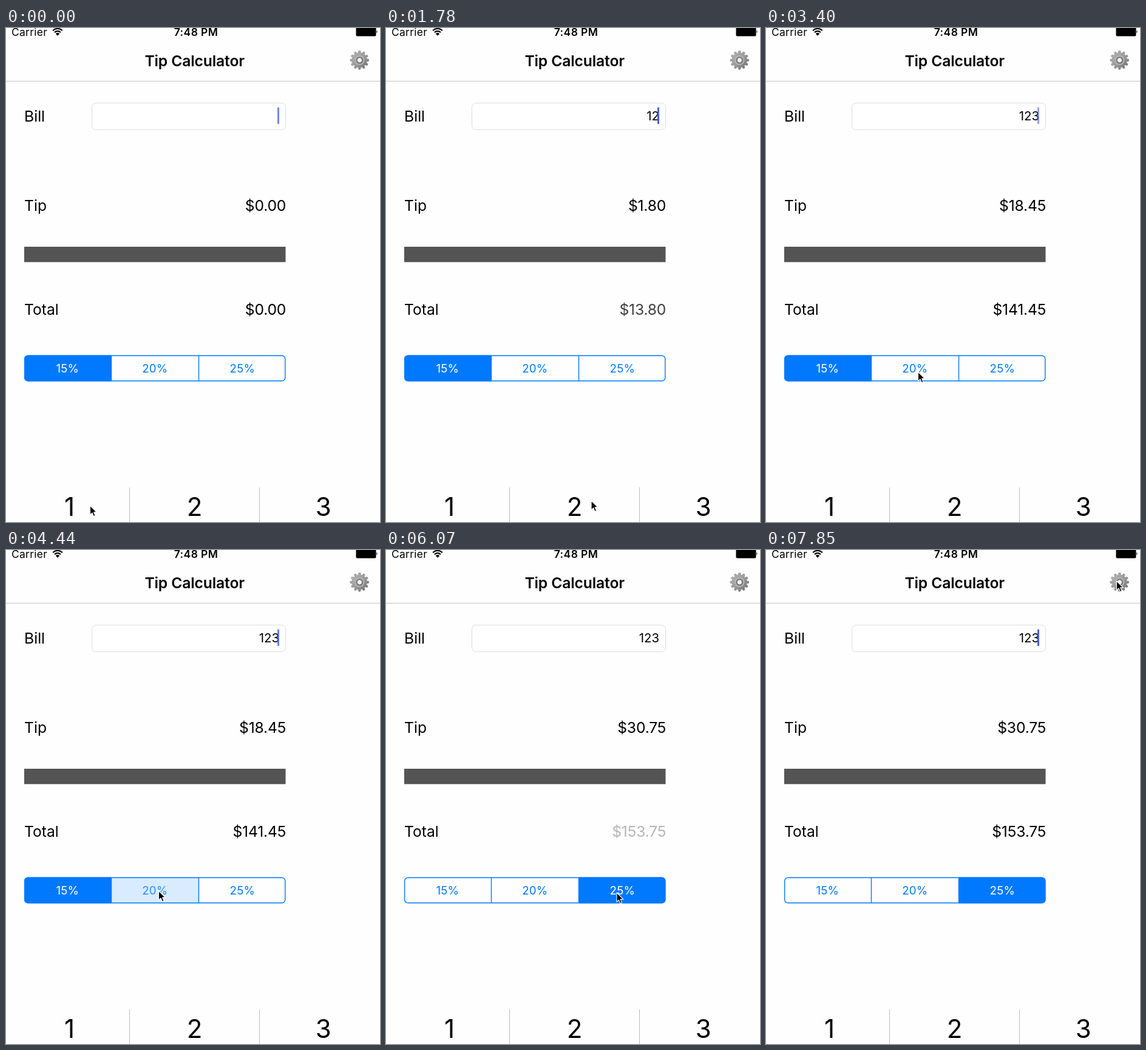
Animation of 616x813 px, one loop 8000 ms. Source, as an HTML page:

```html
<!DOCTYPE html>
<html lang="en">
<head>
<meta charset="utf-8">
<title>Tip Calculator</title>
<style>
  html, body { margin: 0; width: 100%; height: 100%; overflow: hidden; background: #fefefe; }
  svg { display: block; width: 616px; height: 813px; font-family: Inter, Roboto, sans-serif; }
  .label { font-size: 24.7px; }
  .amount { font-size: 24.7px; letter-spacing: -.2px; text-anchor: end; }
  .title { font-size: 24.7px; font-weight: 600; letter-spacing: -.15px; text-anchor: middle; }
  .status { font-size: 17.5px; letter-spacing: .25px; }
  .clock { font-weight: 600; letter-spacing: .4px; text-anchor: middle; }
  .field { font-size: 20.4px; text-anchor: end; }
  .seg text { font-size: 18.8px; letter-spacing: .15px; text-anchor: middle; fill: #0079ff; }
  .seg rect { fill: none; }
  .seg .pressed rect { fill: #d8ebff; }
  .seg .pressed text { fill: #2b8fff; }
  .seg .chosen rect { fill: #0079ff; }
  .seg .chosen text { fill: #fff; }
  .key text { font-size: 42px; text-anchor: middle; }
  .key rect { fill: none; }
  .key.pressed rect { fill: #d1d5db; }
</style>
</head>
<body>
<svg viewBox="0 0 616 813">
  <defs>
    <linearGradient id="metal" x1="0" y1="0" x2="1" y2="1">
      <stop offset="0" stop-color="#b9b9b9"/>
      <stop offset=".55" stop-color="#989898"/>
      <stop offset="1" stop-color="#686868"/>
    </linearGradient>
    <clipPath id="pill"><rect x="30" y="538.5" width="430.5" height="43" rx="6"/></clipPath>
  </defs>
  <rect width="616" height="813" fill="#fefefe"/>

  <text class="status" x="9" y="13">Carrier</text>
  <g fill="none" stroke="#000" stroke-width="2.3">
    <path d="M77.2 4.2A11 11 0 0 1 92.8 4.2"/>
    <path d="M80 7.2A7 7 0 0 1 90 7.2"/>
  </g>
  <path d="M85 12.8L81.8 9.4A4.6 4.6 0 0 1 88.2 9.4Z"/>
  <text class="status clock" x="313" y="13">7:48 PM</text>
  <rect x="576.5" y="-2" width="33" height="15.5" rx="2"/>
  <path d="M610.5 3.5q2.2 2.5 0 5z"/>

  <text class="title" x="310.7" y="63">Tip Calculator</text>
  <path d="M0 87.5H616" stroke="#c4c4c4"/>
  <g transform="translate(582.3 53)">
    <path id="gear" fill="url(#metal)" stroke="#7d7d7d" stroke-width=".6"/>
    <circle r="7.2" fill="none" stroke="#b8b8b8" stroke-width="1.6"/>
    <circle r="4.6" fill="#f4f4f4" stroke="#747474" stroke-width="1.8"/>
  </g>

  <text class="label" x="30" y="154">Bill</text>
  <rect x="141.5" y="123.5" width="319" height="44" rx="7" fill="#fff" stroke="#dedede"/>
  <text class="field" id="bill" x="450" y="152.3"></text>
  <rect id="caret" x="447" y="130.5" width="3" height="27.5" rx="1" fill="#4263de"/>

  <text class="label" x="30" y="301.3">Tip</text>
  <text class="amount" id="tip" x="461.2" y="301.3"></text>
  <rect x="30" y="360" width="430.5" height="25.3" fill="#545454"/>
  <text class="label" x="30" y="472.3">Total</text>
  <text class="amount" id="total" x="461.2" y="472.3"></text>

  <g class="seg">
    <g id="cells" clip-path="url(#pill)"></g>
    <path d="M173.5 539V581M317.5 539V581" stroke="#0079ff" stroke-width="1.4"/>
    <rect x="30.7" y="539.2" width="429.1" height="41.6" rx="5.4" stroke="#0079ff" stroke-width="1.4"/>
  </g>

  <g id="keys"></g>
  <path d="M203.5 756V813M417.5 756V813" stroke="#bcbcbc"/>

  <path id="arrow" d="M0 0V15.2L3.5 11.9L6 17.7L8.6 16.6L6.1 10.9H10.9Z"
        stroke="#fff" stroke-width="1.1" stroke-linejoin="round"/>
</svg>
<script>
const LOOP = 8000, STEPS = 54;
const $ = id => document.getElementById(id);

function add(parent, tag, attrs, text) {
  const el = document.createElementNS('http://www.w3.org/2000/svg', tag);
  for (const name in attrs) el.setAttribute(name, attrs[name]);
  if (text) el.textContent = text;
  return parent.appendChild(el);
}

function gearPath(teeth) {
  const radii = [12, 15.3, 15.3, 12], offsets = [-.34, -.18, .18, .34];
  let d = '';
  for (let i = 0; i < teeth; i++) {
    offsets.forEach((o, j) => {
      const a = (i + o) / teeth * 2 * Math.PI;
      d += (d ? 'L' : 'M') + (radii[j] * Math.cos(a)).toFixed(2) + ' ' + (radii[j] * Math.sin(a)).toFixed(2);
    });
  }
  return d + 'Z';
}
$('gear').setAttribute('d', gearPath(12));

const rates = [15, 20, 25];
const cells = rates.map((rate, i) => {
  const g = add($('cells'), 'g', {});
  add(g, 'rect', { x: 29.5 + 144 * i, y: 538, width: 144, height: 44 });
  add(g, 'text', { x: 101.3 + 144 * i, y: 567.3 }, rate + '%');
  return g;
});

const keys = [[0, 203, 104.5], [204, 213, 310.5], [418, 198, 522.7]].map(([x, width, mid], i) => {
  const g = add($('keys'), 'g', { class: 'key' });
  add(g, 'rect', { x, y: 756, width, height: 57 });
  add(g, 'text', { x: mid, y: 802.5 }, String(i + 1));
  return g;
});

// step, bill text, chosen segment
const edits = [[-9, '', 0], [3, '1', 0], [11, '12', 0], [17, '123', 0], [32, '123', 1], [41, '123', 2]];
// first step, end step, index
const keyTaps = [[1, 3, 0], [9, 11, 1], [15, 17, 2]];
const segTaps = [[30, 32, 1], [39, 41, 2]];

const smooth = u => u * u * (3 - 2 * u);
const speedUp = u => u ** 1.5;
const slowDown = u => 1 - (1 - u) ** 2.2;
// first step, last step, x, y, easing
const moves = [
  [3, 7, 306.5, 777, smooth],
  [11, 15, 508.5, 783, smooth],
  [18, 23, 250.5, 566, smooth],
  [23, 25, 251.5, 561, smooth],
  [32, 36, 380, 564, smooth],
  [45, 47, 459.5, 272.5, speedUp],
  [47, 53, 577.5, 51, slowDown]
];

function pointer(k) {
  let x = 138.5, y = 786;
  for (const [from, to, tx, ty, ease] of moves) {
    if (k <= from) break;
    const u = ease(Math.min(1, (k - from) / (to - from)));
    x += (tx - x) * u;
    y += (ty - y) * u;
  }
  return [x, y];
}

// The caret blinks once a second, 6.75 steps; the first key press restarts it.
function caretAlpha(k) {
  const p = (k + (k < 3 ? 4.93 : 2)) % 6.75;
  if (p <= 1) return 1;
  if (p < 4) return Math.max(0, 1 - .95 * (p - 1)) ** 1.5;
  return Math.min(1, Math.max(0, (p - 4.1) / 1.1));
}

const pressedAt = (taps, k, i) => taps.some(([from, to, n]) => n === i && k >= from && k < to);
const money = v => '$' + v.toFixed(2);

function draw(k) {
  const [since, text, chosen] = edits.filter(e => e[0] <= k).pop();
  const bill = Number(text), tip = bill * rates[chosen] / 100;
  $('bill').textContent = text;
  $('tip').textContent = money(tip);
  $('total').textContent = money(bill + tip);
  $('total').setAttribute('opacity', [.28, .75][k - since] || 1);
  $('caret').setAttribute('opacity', caretAlpha(k));
  cells.forEach((c, i) => c.setAttribute('class',
    i === chosen ? 'chosen' : pressedAt(segTaps, k, i) ? 'pressed' : ''));
  keys.forEach((c, i) => c.setAttribute('class', pressedAt(keyTaps, k, i) ? 'key pressed' : 'key'));
  $('arrow').setAttribute('transform', `translate(${pointer(k)})`);
}

const start = performance.now();
let shown = -1;
function tick() {
  const t = (performance.now() - start) % LOOP;
  const k = Math.min(STEPS - 1, Math.floor(t * STEPS / LOOP + .1));
  if (k !== shown) draw(shown = k);
  requestAnimationFrame(tick);
}
tick();
</script>
</body>
</html>
```
